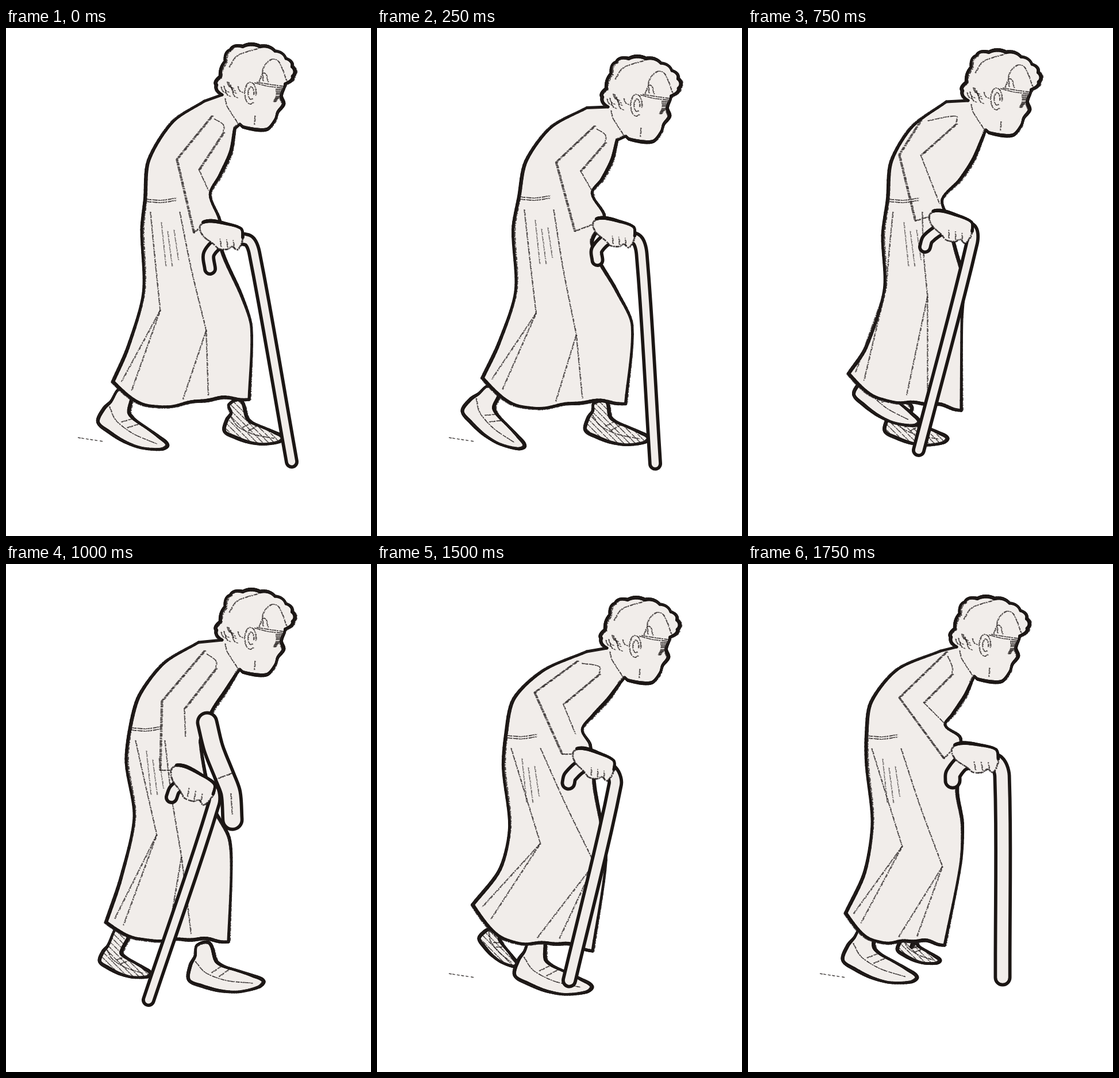
Animation of 635x882 px, one loop 2000 ms. Source, as an HTML page with a canvas:

```html
<!DOCTYPE html>
<html lang="en">
<head>
<meta charset="utf-8">
<title>Walk cycle</title>
<style>
html, body { margin: 0; width: 100%; height: 100%; overflow: hidden; background: #fff; }
canvas { display: block; }
</style>
</head>
<body>
<canvas id="stage" width="635" height="882"></canvas>
<script>
const ctx = document.getElementById('stage').getContext('2d');
const INK = '#1b1614', PAPER = '#f1edea', PENCIL = 'rgba(38,33,32,.78)';
const HOLD = 250, WEIGHT = 5.7;

// Key poses, as x, y pairs.
// front: neck to hem; back: hem to nape; sleeve/inner: shoulder, elbow, cuff;
// near/far foot: heel, toe, leg; bends: where the skirt folds break.
const contactA = {
  head: [0, 0], sag: 34, girth: 24, dust: 1,
  front: [398,175, 391,215, 372,256, 355,289, 372,334, 375,385, 410,465, 427,520, 423,645],
  back: [186,614, 212,555, 239,460, 236,350, 242,297, 248,230, 290,163, 345,127],
  sleeve: [358,152, 296,228, 326,356], inner: [378,180, 335,245, 352,282],
  hand: [335,348, 411,356], cane: [355,418, 353,392, 375,371, 420,368, 432,390, 497,753],
  near: [160,684, 281,724, 208,630], far: [380,700, 482,711, 398,650], bends: [268,490, 348,525]
};
const pushA = {
  head: [52, 42], sag: 42, girth: 24, dust: 0,
  front: [437,215, 427,242, 410,270, 393,285, 420,323, 373,363, 425,450, 461,513, 442,660],
  back: [181,601, 212,540, 243,455, 237,350, 252,289, 270,233, 315,182, 385,150],
  sleeve: [398,187, 325,238, 360,350], inner: [416,215, 372,250, 405,300],
  hand: [412,335, 485,350], cane: [412,388, 412,378, 434,359, 480,364, 489,395, 471,760],
  near: [137,646, 233,727, 198,625], far: [345,697, 463,712, 378,650], bends: [285,500, 345,540]
};
const pass = {
  head: [7, 10], sag: 26, girth: 24, dust: 0,
  front: [410,186, 392,228, 368,264, 338,297, 345,325, 361,385, 375,440, 372,510, 371,664],
  back: [175,600, 205,555, 237,455, 234,360, 243,297, 249,232, 285,172, 345,128],
  sleeve: [300,160, 262,220, 290,335], inner: [362,165, 300,220, 333,305],
  hand: [313,328, 390,345], cane: [308,380, 313,366, 340,348, 386,348, 390,372, 297,733],
  near: [184,636, 298,684, 215,618], far: [238,700, 347,712, 275,652], bends: [240,450, 312,466]
};
const contactB = {
  head: [0, 16], sag: 20, girth: 24, dust: 0,
  front: [400,192, 382,220, 360,252, 345,283, 338,310, 360,420, 388,475, 392,530, 387,656],
  back: [174,622, 200,545, 223,440, 209,345, 216,284, 232,228, 275,172, 335,136],
  sleeve: [345,150, 270,238, 267,358], inner: [365,180, 310,250, 312,300],
  hand: [285,358, 362,391], cane: [288,405, 294,391, 322,373, 358,389, 362,415, 248,757],
  near: [318,722, 448,724, 343,660], far: [163,690, 252,711, 207,630], bends: [262,470, 305,508],
  arm: [350,275, 361,320, 380,368, 391,398, 394,444]
};
const pushB = {
  head: [61, 32], sag: 45, girth: 23, dust: 0,
  front: [455,210, 427,240, 395,265, 371,295, 372,325, 394,385, 407,450, 427,508, 408,682],
  back: [163,577, 225,525, 245,465, 233,360, 242,297, 262,228, 320,186, 395,153],
  sleeve: [352,184, 284,214, 302,322], inner: [418,190, 342,245, 345,310],
  hand: [325,334, 391,368], cane: [310,384, 315,374, 342,357, 380,374, 387,396, 226,728],
  near: [314,740, 454,750, 352,660], far: [95,630, 155,704, 180,598], bends: [300,480, 418,515],
  arm: [395,268, 399,308, 440,378, 456,405, 453,432]
};
const plant = {
  head: [-13, 28], sag: 32, girth: 31, dust: 1,
  front: [388,207, 378,228, 355,262, 343,280, 370,303, 364,395, 373,450, 370,520, 342,662],
  back: [170,606, 203,535, 216,450, 206,350, 206,298, 214,240, 260,183, 335,151],
  sleeve: [345,152, 262,232, 340,338], inner: [355,190, 305,240, 345,280],
  hand: [352,326, 434,330], cane: [356,376, 357,364, 376,344, 430,343, 442,368, 443,718],
  near: [165,688, 294,717, 207,635], far: [260,670, 334,688, 288,654], bends: [268,490, 338,525]
};

const half = (a, b) => Array.isArray(a) ? a.map((v, i) => half(v, b[i])) : (a + b) / 2;

function between(a, b) {
  const pose = {};
  for (const key in a) if (key in b) pose[key] = half(a[key], b[key]);
  return pose;
}

const CYCLE = [contactA, between(contactA, pushA), pushA, pass,
  contactB, pushB, between(pushB, plant), plant];

// Head at its rest place; the hair points are the dips between curls.
const HAIR = [376,116, 366,99, 373,84, 381,58, 390,38, 412,32, 442,32, 468,40, 487,53, 498,67, 499,84, 486,97];
const FACE = [486,97, 484,104, 479,118, 483,132, 473,146, 469,158, 456,175, 440,177, 413,172, 407,167];
const TUFT = [447,92, 447,70, 460,55, 472,56, 481,72, 488,92];

// Outlines in units of their own length: along, then across.
const SHOE = [0,0, .18,.08, .42,.14, .67,.15, .94,.08, 1,0, .85,-.07, .66,-.13, .46,-.19, .36,-.26];
const HEEL = [.08,-.32, .02,-.2];
const HAND = [.02,-.02, .09,-.15, .28,-.2, .57,-.18, .96,-.1, 1.02,.08, 1,.25, .92,.39, .8,.33, .7,.4, .5,.41, .38,.32, .12,.16];

const pairs = a => Array.from({ length: a.length / 2 }, (_, i) => [a[2 * i], a[2 * i + 1]]);
const lerp = (p, q, t) => [p[0] + (q[0] - p[0]) * t, p[1] + (q[1] - p[1]) * t];
const dist = (p, q) => Math.hypot(q[0] - p[0], q[1] - p[1]);
const move = (line, dx, dy) => line.map(([x, y]) => [x + dx, y + dy]);

// Maps (along, across) onto the axis from p to q.
const axis = (p, q) => ([u, v]) => [
  p[0] + (q[0] - p[0]) * u - (q[1] - p[1]) * v,
  p[1] + (q[1] - p[1]) * u + (q[0] - p[0]) * v];

function random(seed) {
  return () => {
    seed = (seed * 16807) % 2147483647;
    return seed / 2147483647;
  };
}

// Smooth curve whose tangents scale with each span, so uneven spans stay calm.
function curve(p, closed = false) {
  const n = p.length, out = [], steps = 8;
  const at = i => closed ? p[(i + n) % n] : p[Math.max(0, Math.min(n - 1, i))];
  for (let i = 0; i < (closed ? n : n - 1); i++) {
    const [a, b, c, d] = [at(i - 1), at(i), at(i + 1), at(i + 2)];
    const span = dist(b, c) * 0.85;
    const ac = span / (dist(a, c) || 1), bd = span / (dist(b, d) || 1);
    for (let s = 0; s < steps; s++) {
      const t = s / steps, t2 = t * t, t3 = t2 * t;
      out.push([0, 1].map(j =>
        b[j] * (2 * t3 - 3 * t2 + 1) + c[j] * (3 * t2 - 2 * t3) +
        (c[j] - a[j]) * ac * (t3 - 2 * t2 + t) + (d[j] - b[j]) * bd * (t3 - t2)));
    }
  }
  out.push(closed ? out[0] : p[n - 1]);
  return out;
}

function trace(line) {
  ctx.beginPath();
  line.forEach(([x, y]) => ctx.lineTo(x, y));
}

function stroke(line, color, w) {
  trace(line);
  ctx.strokeStyle = color;
  ctx.lineWidth = w;
  ctx.stroke();
}

function fill(line) {
  trace(line);
  ctx.fillStyle = PAPER;
  ctx.fill();
}

// Brush line of slightly uneven weight.
function ink(line, w = WEIGHT) {
  for (let i = 1; i < line.length; i++)
    stroke([line[i - 1], line[i]], INK, w * (0.97 + 0.16 * Math.sin(i * 0.19)));
}

// Grainy pencil line: two broken passes.
function pencil(line, w = 1.6) {
  ctx.save();
  ctx.lineCap = 'butt';
  ctx.setLineDash([7, 1, 3, 1.5, 10, 1, 2, 2]);
  stroke(line, PENCIL, w);
  ctx.setLineDash([2, 3, 5, 4, 1, 2]);
  stroke(move(line, 1.2, 0.5), PENCIL, w * 0.7);
  ctx.restore();
}

// Loose charcoal pass that strays a little from the outline.
function fringe(line) {
  pencil(line.map(([x, y], i) => [x + 3 * Math.sin(i * 0.11), y + 2 * Math.cos(i * 0.07)]), 2);
}

function shape(line) {
  fill(line);
  ink(line);
  fringe(line);
}

function tube(line, w) {
  stroke(line, INK, w);
  stroke(line, PAPER, w - 11.5);
}

function hatch(line) {
  const xs = line.map(p => p[0]), ys = line.map(p => p[1]);
  const top = Math.min(...ys), h = Math.max(...ys) - top;
  ctx.save();
  trace(line);
  ctx.clip();
  for (let x = Math.min(...xs) - h; x < Math.max(...xs); x += 10)
    pencil([[x, top], [x + h, top + h]], 1.4);
  ctx.restore();
}

function foot(keys, shaded) {
  const [heel, toe, leg] = pairs(keys);
  const put = axis(heel, toe), ankle = put([0.22, -0.3]);
  const side = 11 / dist(ankle, leg);
  const nx = (ankle[1] - leg[1]) * side, ny = (leg[0] - ankle[0]) * side;
  const line = curve([...pairs(SHOE).map(put), [leg[0] + nx, leg[1] + ny],
    [leg[0] - nx, leg[1] - ny], ...pairs(HEEL).map(put)], true);
  shape(line);
  if (shaded) hatch(line);
  pencil(curve([[0.08, -0.25], [0.22, -0.1], [0.5, 0], [0.85, 0.03]].map(put)));
  pencil([[0.3, -0.1], [0.42, -0.18]].map(put));
  pencil([[0.4, -0.05], [0.54, -0.15]].map(put));
}

function hemLine(pose) {
  const from = pairs(pose.front).pop(), to = pairs(pose.back)[0];
  return t => {
    const [x, y] = lerp(from, to, t);
    return [x, y + pose.sag * Math.sin(Math.PI * t * t) + 2 * Math.sin(t * 25) * (1 - t)];
  };
}

function hair() {
  return curve(pairs(HAIR)).map(([x, y], i) => {
    const out = 1 + 3 * Math.sin(Math.PI * (i % 8) / 8) / Math.hypot(x - 434, y - 82);
    return [434 + (x - 434) * out, 82 + (y - 82) * out];
  });
}

function bodyOutline(pose, hem) {
  const [dx, dy] = pose.head;
  const edge = Array.from({ length: 39 }, (_, i) => hem((i + 1) / 40));
  return [...curve(pairs(pose.front)), ...edge, ...curve(pairs(pose.back)),
    ...move(hair(), dx, dy), ...move(curve(pairs(FACE)), dx, dy), pose.front.slice(0, 2)];
}

function headDetails([dx, dy]) {
  const line = (...p) => pencil(curve(move(p, dx, dy)));
  const ring = (x, y, rx, ry) => line(...Array.from({ length: 10 }, (_, i) =>
    [x + rx * Math.cos(i * 0.62 + 1), y + ry * Math.sin(i * 0.62 + 1)]));
  ring(425, 113, 10, 19);
  ring(426, 113, 5, 11);
  line([432, 95], [455, 101], [484, 104]);
  line([436, 94], [460, 98], [482, 101]);
  for (let i = 0; i < 4; i++) line([470 + i * 3, 105], [470 + i * 2, 118], [465 + i, 128]);
  line(...pairs(TUFT));
  line([440, 93], [449, 78], [456, 94]);
  line([388, 68], [402, 48], [440, 35]);
  line([433, 152], [432, 168]);
  line([381, 122], [384, 135], [403, 165]);
  const rnd = random(11);
  for (let i = 0; i < 9; i++) {
    const x = 374 + rnd() * 34, y = 92 + rnd() * 22;
    line([x, y], [x + 3, y + 8], [x + 9, y + 11]);
  }
}

function sleeveLines(pose) {
  const [top, elbow, cuff] = pairs(pose.sleeve);
  const [top2, elbow2, cuff2] = pairs(pose.inner);
  for (const d of [0, 2]) {
    pencil(move([top, elbow], d, 0));
    pencil(move(curve([elbow, lerp(elbow, cuff, 0.5), cuff]), d, 0));
    pencil(move(curve([top2, lerp(top2, elbow2, 0.5), elbow2]), d, 1));
  }
  pencil([elbow2, cuff2]);
  pencil(curve([lerp(top, top2, 0.2), [top2[0], top2[1] - 12], top2]));
  pencil([cuff, pose.hand.slice(0, 2)], 2);
}

function folds(pose, hem) {
  const waist = pairs(pose.back)[4], [rear, fore] = pairs(pose.bends);
  const rnd = random(5);
  for (const d of [0, 4]) pencil(curve(move([waist, [waist[0] + 28, waist[1] + 2], [waist[0] + 55, waist[1] - 2]], 0, d)));
  const fold = (bend, dx, ends) => {
    const top = [waist[0] + dx, waist[1] + 22];
    pencil(curve([top, lerp(lerp(top, bend, 0.5), waist, 0.04), bend]));
    ends.forEach(t => pencil(lerpLine(bend, hem(t), 0.93)));
  };
  fold(rear, 9, [0.88, 0.96]);
  fold(fore, 60, [0.3, 0.5]);
  for (let i = 0; i < 3; i++) {
    const x = waist[0] + 28 + i * 11, y = waist[1] + 40 + rnd() * 20;
    pencil([[x, y], [x + 8, y + 50 + rnd() * 40]], 1);
  }
}

const lerpLine = (p, q, t) => [p, lerp(p, q, t)];

function grip(keys) {
  const [wrist, knuckle] = pairs(keys);
  const put = axis(wrist, knuckle), line = curve(pairs(HAND).map(put), true);
  fill(line);
  pencil(line, 2.6);
  ink(line.slice(8, 42));
  for (const u of [0.55, 0.7, 0.85]) pencil([[u, 0.36], [u - 0.04, 0.18]].map(put));
}

function farArm(keys) {
  const p = pairs(keys), wrist = axis(p[2], p[3]);
  tube(curve(p), 39);
  pencil([wrist([0, -0.45]), wrist([0, 0.45])], 2);
  pencil(lerpLine(p[3], p[4], 0.8));
}

function dust() {
  const rnd = random(3);
  for (let x = 125; x < 166; x += 6 + rnd() * 5)
    pencil([[x, 711 + (x - 125) * 0.15], [x + 5, 712 + (x - 125) * 0.15]], 1.4);
}

function draw(pose) {
  const hem = hemLine(pose);
  ctx.fillStyle = '#fff';
  ctx.fillRect(0, 0, 635, 882);
  ctx.lineCap = ctx.lineJoin = 'round';
  foot(pose.far, true);
  foot(pose.near, false);
  shape(bodyOutline(pose, hem));
  folds(pose, hem);
  if (pose.arm) farArm(pose.arm);
  sleeveLines(pose);
  headDetails(pose.head);
  tube(curve(pairs(pose.cane)), pose.girth);
  grip(pose.hand);
  if (pose.dust) dust();
}

const start = performance.now();
let shown = -1;
function tick() {
  const i = Math.floor((performance.now() - start) / HOLD) % CYCLE.length;
  if (i !== shown) draw(CYCLE[shown = i]);
  requestAnimationFrame(tick);
}
tick();
</script>
</body>
</html>
```
